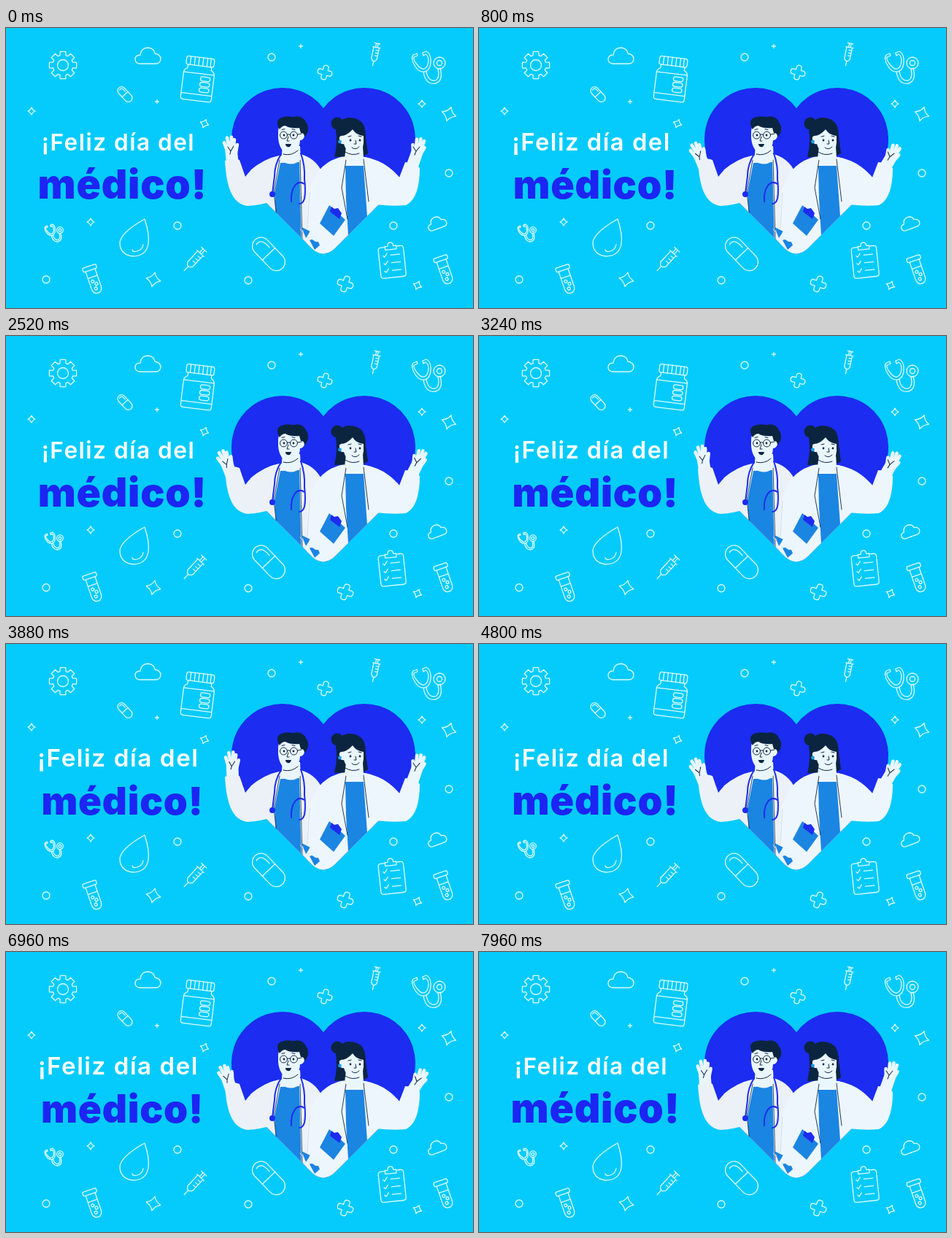
These frames come from a looping animation (640x384 px, 8 s). An HTML page:

```html
<!DOCTYPE html>
<html lang="es">
<head>
<meta charset="utf-8">
<title>¡Feliz día del médico!</title>
<style>
  html, body { margin: 0; width: 100%; height: 100%; overflow: hidden; background: #04cbfb; }
  svg { display: block; width: 640px; height: 384px; }
  text { font-family: Inter, sans-serif; text-anchor: middle; }
  #icons { fill: none; stroke: #defaff; stroke-linecap: round; stroke-linejoin: round; }
  .line { fill: none; stroke-linecap: round; stroke-linejoin: round; }
  .skin { fill: #eaf6fe; }
  .finger { stroke: #eaf6fe; stroke-width: 4.6; }
  .ink { stroke: #0d2740; }
  .hair { fill: #0b2540; }
  .shirt { fill: #1b85e2; }
  .tube { stroke: #1c2cf0; stroke-width: 2; }
  .coatM { fill: #ebf1f7; }
  .coatW { fill: #edf6fd; }
</style>
</head>
<body>
<svg viewBox="0 0 640 384">
  <defs>
    <path id="heart" d="M435 110A70 70 0 0 0 309 152C309 178 320 202 339 222L420 303Q435 316 450 303L531 222C550 202 561 178 561 152A70 70 0 0 0 435 110Z"/>
    <clipPath id="inside"><use href="#heart"/></clipPath>
  </defs>
  <rect width="640" height="384" fill="#04cbfb"/>
  <g id="icons"></g>

  <g id="top"><text x="154" y="168" font-size="32.5" font-weight="600" letter-spacing="1.5" fill="#fff">¡Feliz día del</text></g>
  <g id="bottom"><text x="159.5" y="234" font-size="54" font-weight="900" letter-spacing=".8" fill="#1c25f2">médico!</text></g>

  <use href="#heart" fill="#1c2cf0"/>

  <!-- man -->
  <g id="handL">
    <path class="skin" d="M303 197L300 163Q307 155 315 161L317 168L320 197Z"/>
    <path class="line finger" d="M303 168L299 157M306 164L303 150.5M309 164L309 149.5M312 165L313 153M315 171L317 160"/>
    <path class="line ink" d="M304 163L308 169L312 162M308 169L307 173" stroke-width="1"/>
  </g>
  <path class="coatM" d="M300 182Q312 177 320 181L328 204Q342 184 372 177L390 182V238L366 237Q350 243 331 244C308 241 302 214 300 182Z"/>
  <g clip-path="url(#inside)">
    <path class="coatM" d="M335 195Q354 179 374 175L404 173Q428 180 436 205V320H330Z"/>
    <path class="shirt" d="M376 185L402 184L405 300H372L368 225Z"/>
    <path class="line ink" d="M375 181L367 225L372 268M403 178L406 290" stroke-width=".8"/>
  </g>
  <path class="skin" d="M379 162H403L404 180Q393 192 377 182Z"/>
  <path class="skin" d="M373 142Q373 132 384 131H403L405 141Q411 141 409 149Q407 154 403 154Q402 171 389 173Q375 171 373 151Z"/>
  <path class="hair" d="M375 139Q368 127 377 123Q384 120 394 122Q406 119 411 129Q416 136 413 144L409 150Q409 143 404 144L402 137Q389 138 383 134Q378 134 375 139Z"/>
  <g class="line ink" stroke-width="1">
    <circle cx="380.5" cy="147" r="5"/><circle cx="394.5" cy="147" r="5"/>
    <path d="M385.5 146H389.5M399.5 146L405 145M378 139.5L382 138.5M392 138.5L396 139.5M387 149L385 155L388 155M380 173Q391 176 400 168"/>
  </g>
  <circle class="hair" cx="381" cy="147" r="1.4"/><circle class="hair" cx="394" cy="147" r="1.4"/>
  <path class="hair" d="M383 159H391Q390 164 386 163Q383 162 383 159Z"/>
  <path class="line tube" d="M377 173Q368 187 368 203L365 227M404 172Q410 188 409 207Q411 224 409 234Q407 241 402 241M409 214Q402 209 396 216Q390 224 391 238"/>
  <circle cx="365" cy="228" r="4" fill="#1c2cf0"/>

  <!-- woman -->
  <g id="handR">
    <path class="skin" d="M545 198L556 167Q563 157 573 162L571 173L562 200Z"/>
    <path class="line finger" d="M558 171L557.5 160M562 165L563 152.5M566 165L568.5 152M569 166L573 155M570 170L573.5 164"/>
    <path class="line ink" d="M558 163L562 169L567 163M562 169L560 174" stroke-width="1"/>
  </g>
  <path class="coatW" d="M547 184Q559 184 567 192C567 214 563 236 548 243Q530 245 505 242L480 240V180L492 177Q520 182 539 205Z"/>
  <g clip-path="url(#inside)">
    <path class="coatW" d="M462 176L492 177Q525 184 545 212V320H412L413 235Q417 206 434 190Q445 180 462 176Z"/>
    <path class="shirt" d="M465 189H490L498 300H470L466 235Z"/>
    <path class="line ink" d="M466 181L460 219L468 262M490 180L497 238" stroke-width=".9"/>
    <path class="line" d="M416 226L413 275M403 276L428 302" stroke="#d3deea"/>
    <path class="shirt" d="M443 243L465 263L449 285L430 268Z"/>
    <path class="shirt" d="M405 273L417 279L411 288ZM416 291L426 288L430 298L423 304Z"/>
    <path fill="#1c2cf0" d="M446 245L450 248L455 247L460 254L457 262L444 252Z"/>
    <path class="skin" d="M416 279L429 284L435 294L424 293L415 287Z"/>
  </g>
  <circle class="hair" cx="454" cy="131" r="8.5"/>
  <path class="hair" d="M452 140Q454 126 468 123Q482 122 489 131Q493 138 493 150L496 172Q485 179 473 176L450 177Q455 158 452 140Z"/>
  <path class="skin" d="M466 162H489L490 178Q477 190 464 179Z"/>
  <path class="skin" d="M459 148Q467 148 475 139Q480 147 490 148V158Q489 170 480 173Q466 171 463 159Q457 160 457 153Q456 149 459 148Z"/>
  <path class="line ink" d="M469 149L473 148M483 148L487 149M479 154L480 159L477 159M474 164Q479 168 484 163M465 170Q474 176 484 172" stroke-width="1"/>
  <circle class="hair" cx="472" cy="154" r="1.4"/><circle class="hair" cx="485" cy="154" r="1.4"/>
  <circle cx="457.5" cy="156" r="2.4" fill="#1f9cf0"/>
</svg>
<script>
const LOOP = 8000, TAU = Math.PI * 2;
const $ = id => document.getElementById(id);

const shapes = {
  ring: '<circle r="5"/>',
  plus: '<path d="M-2.5 0H2.5M0 -2.5V2.5"/>',
  star: '<path d="M0 -10Q2.5 -3 10 0Q2.5 3 0 10Q-2.5 3 -10 0Q-2.5 -3 0 -10Z"/>',
  cross: '<path d="M-3.5 -7Q-3.5 -10 0 -10Q3.5 -10 3.5 -7V-3.5H7Q10 -3.5 10 0Q10 3.5 7 3.5H3.5V7Q3.5 10 0 10Q-3.5 10 -3.5 7V3.5H-7Q-10 3.5 -10 0Q-10 -3.5 -7 -3.5H-3.5Z"/>',
  cloud: '<path d="M-11 10Q-17 9 -17 4Q-17 -2 -10 -2Q-9 -12 1 -12Q9 -11 10 -4Q18 -3 18 4Q17 10 11 10Z"/>',
  pill: '<rect x="-27" y="-12" width="54" height="24" rx="12"/><path d="M0 -12V12M-21 3Q-23 -6 -13 -7H-6"/>',
  bottle: '<rect x="-20" y="-31" width="40" height="12" rx="3"/><path d="M-14 -31V-19M-8 -31V-19M-2 -31V-19M4 -31V-19M10 -31V-19M15 -31V-19M-17 -19V-14Q-22 -12 -22 -7V27Q-22 31 -18 31H18Q22 31 22 27V-7Q22 -12 17 -14V-19M22 -8H-22M-22 22H22"/><rect x="3" y="-4" width="14" height="6" rx="3"/><rect x="3" y="4" width="14" height="6" rx="3"/><rect x="3" y="12" width="14" height="6" rx="3"/>',
  syringe: '<path d="M-4 -9H4V8L1.5 11H-1.5L-4 8ZM-5.5 -9H5.5M-1.3 -9V-15M1.3 -9V-15M-4 -15H4M0 11V18M0 -5H4M0 -1H4M0 3H4"/>',
  steth: '<path d="M-18 -19L-23 -17Q-27 -12 -20 -1Q-15 7 -7 6Q2 3 1 -12Q0 -20 -5 -22L-10 -20M-18 -19L-17 -16L-22 -14Q-23 -10 -17 -3Q-12 3 -8 2Q-2 0 -2 -11Q-3 -17 -6 -18L-9 -16L-10 -20M-9 6Q-6 24 7 22Q19 19 14 1M-5 5Q-3 19 7 18Q14 15 11 2"/><circle cx="13" cy="-6" r="8"/><circle cx="13" cy="-6" r="3.5"/>',
  drop: '<path d="M13 -26Q20 -5 18 8Q15 25 -3 25Q-21 23 -21 6Q-19 -8 13 -26ZM-4 16Q-3 20 3 18Q10 16 11 9"/>',
  vial: '<rect x="-10" y="-20" width="20" height="6" rx="2"/><path d="M-7 -14V13Q-6 20 0 20Q6 20 7 13V-14M-7 -4H7"/><circle cx="-2" cy="2" r="2"/><circle cx="2" cy="7" r="2"/><circle cx="-1" cy="13" r="2"/>',
  board: '<path d="M-8 -20H-14Q-18 -20 -18 -16V20Q-18 24 -14 24H14Q18 24 18 20V-16Q18 -20 14 -20H8M-8 -16V-21H-4Q-4 -26 0 -26Q4 -26 4 -21H8V-16Z"/><path d="M-12 -8L-10 -6L-6 -11M-1 -8H12M-12 3L-10 5L-6 0M-1 3H12M-12 14L-10 16L-6 11M-1 14H12"/>',
  gear: gear()
};

function gear() {
  const points = [];
  for (let i = 0; i < 8; i++) {
    for (const [r, turn] of [[14, -.29], [19, -.2], [19, .2], [14, .29]]) {
      const a = i * TAU / 8 + turn;
      points.push((r * Math.cos(a)).toFixed(1) + ' ' + (r * Math.sin(a)).toFixed(1));
    }
  }
  return `<path d="M${points.join('L')}Z"/><circle r="7.5"/>`;
}

// shape, x, y, rotation, scale
const placed = [
  ['gear', 78, 51], ['cloud', 194, 39], ['bottle', 263.5, 70, 7, .96], ['pill', 163, 91, 47, .45],
  ['plus', 207, 101], ['plus', 404, 25],
  ['star', 35, 114, 0, .5], ['star', 272, 131, 20, .6], ['star', 116, 266, 0, .5],
  ['star', 202, 345, 12], ['star', 570, 104, 0, .5], ['star', 607, 118, 18], ['star', 564, 353, 22, .6],
  ['ring', 364, 40], ['ring', 607, 199], ['ring', 235, 271], ['ring', 55, 345], ['ring', 332, 346], ['ring', 531, 271],
  ['cross', 437, 61, 14], ['cross', 465, 351, 18, 1.1],
  ['syringe', 506, 35, 12, .95], ['syringe', 259, 317, 43, 1.2],
  ['steth', 581, 54], ['steth', 67, 281, -4, .55],
  ['drop', 177, 288], ['vial', 120, 345, -19, .97], ['vial', 601, 332, -19, .97],
  ['pill', 360, 310, 46], ['board', 529, 319, -6, .96], ['cloud', 590, 268, -20, .75]
];
$('icons').innerHTML = placed.map(([name, x, y, turn = 0, size = 1]) =>
  `<g transform="translate(${x} ${y}) rotate(${turn}) scale(${size})" stroke-width="${(1.3 / size).toFixed(2)}">${shapes[name]}</g>`
).join('');

const wave = (t, period, shift = 0) => Math.cos(TAU * (t - shift) / period);

function zoom(id, x, y, s) {
  $(id).setAttribute('transform', `translate(${x} ${y}) scale(${s}) translate(${-x} ${-y})`);
}

function turn(id, angle, x, y) {
  $(id).setAttribute('transform', `rotate(${angle} ${x} ${y})`);
}

function draw(now) {
  const t = now % LOOP;
  const pulse = wave(t, LOOP / 3);
  zoom('top', 153.5, 158, 1 - .026 * pulse);
  zoom('bottom', 159, 215, 1 + .022 * pulse);
  turn('handL', -6.5 + 12 * wave(t, 2000, 1680), 330, 192);
  turn('handR', 6.5 - 6.5 * wave(t, 2000), 525, 178);
  requestAnimationFrame(() => draw(performance.now() - start));
}

const start = performance.now();
draw(0);
</script>
</body>
</html>
```
